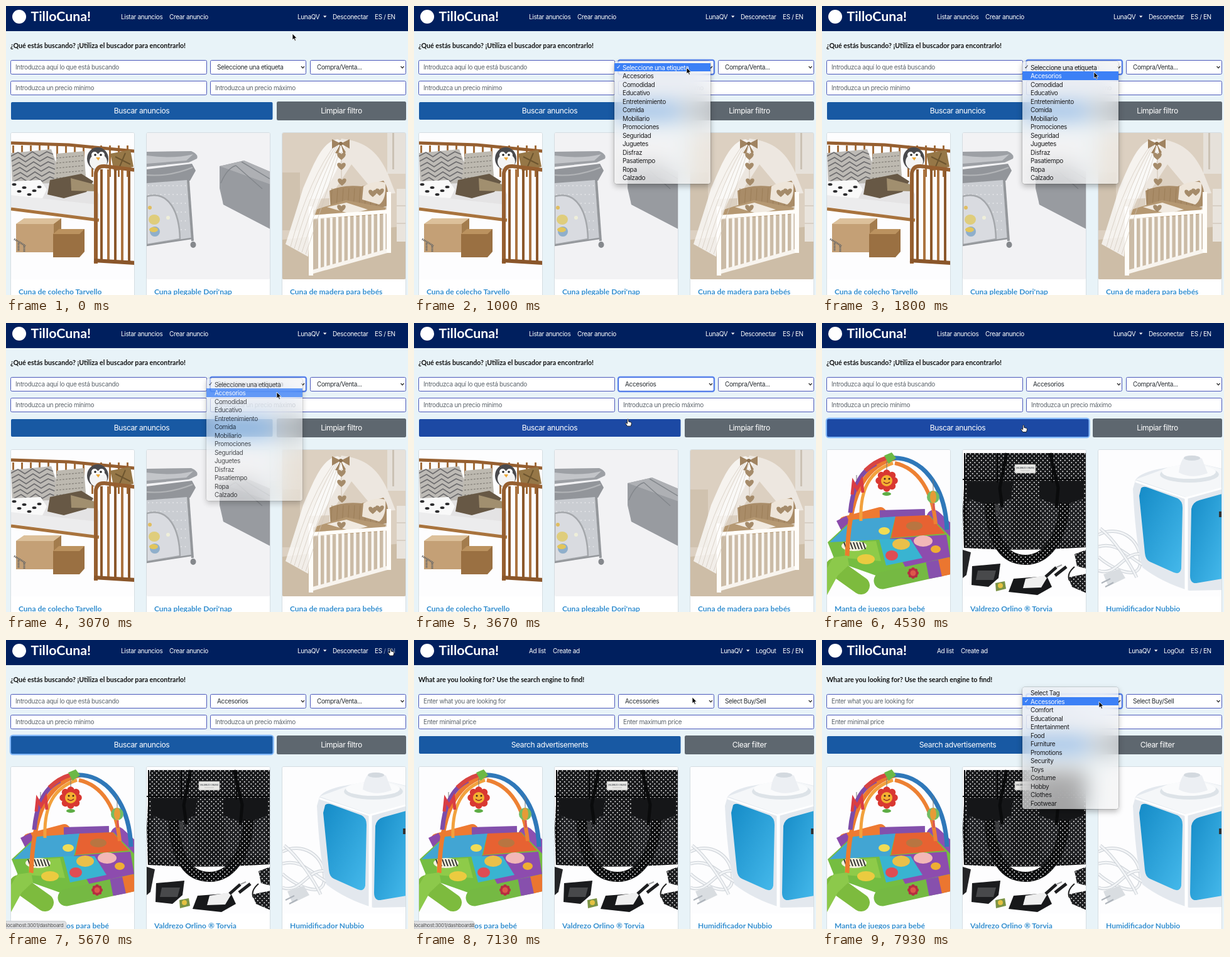
An HTML page for the animation above (8 s loop, 640 px wide and 460 px high).

```html
<!DOCTYPE html>
<html lang="es">
<head>
<meta charset="utf-8">
<title>Buscador de anuncios</title>
<style>
  html, body { margin: 0; width: 100%; height: 100%; overflow: hidden; background: #e8f3f8; }
  svg { position: absolute; left: 0; top: 0; }
  text, #menu { font: 10px Inter, sans-serif; letter-spacing: -.035em; }
  text { fill: #262b31; white-space: pre; }
  .nav { fill: #fff; }
  .hint { fill: #5d656d; }
  .button { font-size: 12.1px; fill: #fff; text-anchor: middle; }
  .brand, .question, .title { font-family: Lato, sans-serif; font-weight: 700; letter-spacing: 0; }
  .brand { font-size: 21.3px; fill: #fff; }
  .question { font-size: 10.6px; fill: #111; }
  .title { font-size: 12px; fill: #348fcf; }
  .status { font-size: 8px; fill: #555; }
  #menu { position: absolute; left: 319px; width: 153px; padding: 2.5px 0 3.25px; border-radius: 4px;
    background: rgba(242, 242, 243, .64); backdrop-filter: blur(16px) saturate(1.5); color: #1c1c1e;
    box-shadow: 0 0 0 .5px rgba(0, 0, 0, .25), 0 4px 10px rgba(0, 0, 0, .28); }
  #menu div { position: relative; height: 13.5px; line-height: 14px; padding-left: 13px; }
  #menu .hover { background: #3c80f6; color: #fff; }
  #menu .checked::before { content: "✓"; position: absolute; left: 3px; font: 9px "DejaVu Sans", sans-serif; line-height: 13.5px; }
</style>
</head>
<body>
<svg id="page" width="640" height="460"></svg>
<div id="menu"></div>
<svg width="640" height="460">
  <g id="cursor">
    <path id="arrow" d="M0 0V10L2.3 7.9 3.8 11.4 5.5 10.7 4 7.2H7Z" fill="#000" stroke="#fff" stroke-width=".8"/>
    <path id="hand" d="M-1 .6Q0-.7 1 .6V3.8L4.8 4.8Q6 5.3 5.6 7.8L4.6 11H-1L-4 6.6Q-3.4 5-1 7Z" fill="#fff" stroke="#111" stroke-width=".9"/>
  </g>
</svg>
<script>
const $ = id => document.getElementById(id);
const range = (n, make) => Array.from({ length: n }, (_, i) => make(i)).join('');
const text = (x, y, s, cls = '', id = '') => `<text x="${x}" y="${y}" class="${cls}" id="${id}">${s}</text>`;
const rect = (x, y, w, h, fill, extra = '') => `<rect x="${x}" y="${y}" width="${w}" height="${h}" fill="${fill}" ${extra}/>`;
const shape = (d, fill, extra = '') => `<path d="${d}" fill="${fill}" ${extra}/>`;
const line = (d, color, width = 1, extra = '') => shape(d, 'none', `stroke="${color}" stroke-width="${width}" ${extra}`);
const oval = (x, y, rx, ry, fill, extra = '') => `<ellipse cx="${x}" cy="${y}" rx="${rx}" ry="${ry}" fill="${fill}" ${extra}/>`;
const dot = (x, y, r, fill) => oval(x, y, r, r, fill);
const group = (id, body, extra = '') => `<g id="${id}" ${extra}>${body}</g>`;

const languages = {
  es: {
    nav: [[183, 'Listar anuncios'], [260, 'Crear anuncio'], [464, 'LunaQV'], [520, 'Desconectar']], caret: 505,
    question: '¿Qué estás buscando? ¡Utiliza el buscador para encontrarlo!',
    hints: ['Introduzca aquí lo que está buscando', 'Introduzca un precio mínimo', 'Introduzca un precio máximo'],
    deal: 'Compra/Venta...', search: 'Buscar anuncios', clear: 'Limpiar filtro',
    tags: ['Seleccione una etiqueta', 'Accesorios', 'Comodidad', 'Educativo', 'Entretenimiento', 'Comida', 'Mobiliario',
      'Promociones', 'Seguridad', 'Juguetes', 'Disfraz', 'Pasatiempo', 'Ropa', 'Calzado']
  },
  en: {
    nav: [[183, 'Ad list'], [221, 'Create ad'], [488, 'LunaQV'], [544, 'LogOut']], caret: 529,
    question: 'What are you looking for? Use the search engine to find!',
    hints: ['Enter what you are looking for', 'Enter minimal price', 'Enter maximum price'],
    deal: 'Select Buy/Sell', search: 'Search advertisements', clear: 'Clear filter',
    tags: ['Select Tag', 'Accessories', 'Comfort', 'Educational', 'Entertainment', 'Food', 'Furniture',
      'Promotions', 'Security', 'Toys', 'Costume', 'Hobby', 'Clothes', 'Footwear']
  }
};

const labels = L =>
  L.nav.map(([x, s]) => text(x, 21, s, 'nav')).join('') + shape(`M${L.caret} 15.5h5.4l-2.7 3z`, '#fff') +
  text(7, 67, L.question, 'question') +
  text(15, 101.2, L.hints[0], 'hint') + text(15, 134.2, L.hints[1], 'hint') + text(333, 134.2, L.hints[2], 'hint') +
  text(495, 101.2, L.deal) + text(216, 171.3, L.search, 'button') + text(534, 171.3, L.clear, 'button');

const field = (x, y, w) => rect(x, y, w, 22, '#fff', 'rx="2" stroke="#4a57ba"');
const chevron = x => line(`M${x - 2.5} 96l2.5 2.8 2.5-2.8`, '#333', 1.3);
const cardX = [7.5, 223.5, 439.5];
const card = x => rect(x, 201.5, 197, 270, '#fff', 'rx="2.5" stroke="#d5dde2"');
const titles = names => names.map((s, i) => text(cardX[i] + 12.5, 458.5, s, 'title')).join('');
const photos = list => list.map((body, i) => group('', body, `clip-path="url(#clip${i})"`)).join('');

const coSleeper = () => {
  const wood = '#965f30';
  return rect(8, 202, 198, 234, '#fdfdfe') +
    range(14, i => rect(10 + i * 14, 222, 3, 50, '#a26c3a')) +
    line('M8 218L100 221 205 231', wood, 5) +
    shape('M8 280L62 268 140 280 148 300V340L8 318Z', '#e4e3e4') +
    shape('M8 234L72 228 80 250 76 282 10 284Z', '#bdbab5') +
    range(6, i => line(`M${8 + i} ${239 + i * 8}l11-6 11 7 12-8 11 7 12-7 10 4`, '#6d6c6e', 1.6)) +
    shape('M81 235L124 231 127 270 120 283 76 279Z', '#bdb9b0') +
    range(5, i => line(`M80 ${242 + i * 8}L125 ${238 + i * 8}`, '#86827b', 1.3, 'stroke-dasharray="3 2"')) +
    shape('M166 235L198 229 203 256 172 263Z', '#967747') + line('M174 240L198 252M190 234L180 258', '#6d552f', 2) +
    oval(146, 243, 17, 18, '#4a4a4d') + oval(147, 248, 14, 13, '#f4f4f4') + dot(141, 237, 5, '#fff') + dot(152, 237, 5, '#fff') +
    dot(142, 237, 1.8, '#222') + dot(151, 237, 1.8, '#222') + shape('M143 241h7l-3 5z', '#eda735') +
    shape('M8 279L55 277 65 292 58 306 8 303Z', '#f9f9f9') +
    range(6, i => oval(13 + i * 8, 284 + i * 11 % 17, 3.5, 2, '#2c2c2e')) +
    shape('M70 277L120 267 139 279 128 296 92 306 66 300Z', '#675845') + shape('M103 274L141 284 146 295 104 294Z', '#a18f6f') +
    shape('M8 301L145 316V338L8 320Z', '#ececed') +
    line('M8 323L148 341', '#a8733d', 5) +
    range(6, i => rect(150 + i * 11, 260, 4, 146, i % 2 ? '#ab7340' : '#8c582b')) +
    line('M143 410V266Q145 254 157 255L206 261', wood, 6) + line('M140 405L206 409', '#8a562a', 6) +
    shape('M16 347L29 338H88V379L76 392H16Z', '#c4a076') + shape('M16 347L29 338H88L76 347Z', '#dcc09a') + shape('M76 347L88 338V379L76 392Z', '#a37c4d') +
    shape('M75 363L84 355H125V391L117 400H75Z', '#9a7042') + shape('M75 363L84 355H125L117 363Z', '#bb925f') +
    line('M13 371L20 375 31 382M20 377V390M29 382V391', '#666', 3, 'stroke-dasharray="1.5 1"');
};

const travelCot = () =>
  rect(224, 202, 197, 234, '#f2f2f4') +
  shape('M224 232L295 231Q307 236 304 243L291 249 224 256Z', '#9da0a5') + shape('M224 238Q265 244 298 236L287 246 224 251Z', '#c3c5c9') +
  shape('M224 260L296 251 302 262 293 278 224 283Z', '#92959a') + line('M224 269Q260 272 297 257', '#b3b5b8', 2) +
  shape('M224 282L288 277 295 369 224 381Z', '#cacdd2') +
  range(60, i => dot(227 + i % 10 * 6.5, 286 + Math.floor(i / 10) * 14, .8, '#f4f4f6')) +
  shape('M224 303C260 293 276 329 277 371L224 380Z', '#d9dbe0', 'stroke="#a4a7ab" stroke-width="2.5"') +
  oval(236, 340, 9, 8, '#dfcd7c') + dot(237, 359, 8, '#8fafcb') + oval(235, 356, 7, 4, '#e2c55b') + dot(229, 321, 3, '#e0bd60') + dot(258, 337, 3, '#eeeed9') +
  line('M224 381L295 370', '#94979b', 2.5) + line('M290 278L297 374', '#94979b', 4) + oval(298, 380, 4.5, 5, '#85888c') +
  shape('M340 255L379 246 421 264V355L346 316 340 290Z', '#9a9da2') + shape('M340 255L379 246 421 264V284Z', '#aeb0b4') +
  shape('M340 255L421 284V355L346 316Z', '#989ba0') + line('M342 282Q352 258 366 254L408 291M375 248L420 275', '#83878c', 1.5);

const heart = (x, y) => shape(`M${x} ${y + 6}C${x - 13} ${y - 3} ${x - 4} ${y - 9} ${x} ${y - 3}C${x + 4} ${y - 9} ${x + 13} ${y - 3} ${x} ${y + 6}Z`, '#a58b6a');
const canopyCrib = () =>
  rect(440, 202, 197, 234, '#dcd0c1') + shape('M440 372L637 350V436H440Z', '#cdbda7') +
  rect(607, 202, 30, 65, '#e6e1da') + rect(615, 202, 3, 58, '#cbc1b4') + rect(622, 291, 15, 84, '#e9e4dd') + line('M622 318h15M622 346h15', '#c7bbac') +
  rect(440, 265, 28, 92, '#d0c2af') +
  shape('M534 211C572 216 593 231 609 270L620 298 590 300 550 252 515 306 482 307Z', '#fff', 'opacity=".5"') +
  range(10, i => rect(515 + i * 9, 292, 3, 45, '#f1ece4')) +
  shape('M515 294Q535 284 566 287L601 278Q612 293 607 318L567 330 517 325Z', '#a98c68') +
  range(9, i => line(`M${519 + i * 9} 290l-2 33`, '#967751', .7)) +
  shape('M569 287Q588 276 604 281 606 308 594 316L567 308Z', '#eee5d9') + heart(584, 298) + heart(595, 296) +
  shape('M487 326L541 309 605 321 600 334 490 338Z', '#b59872') + shape('M511 320L542 313 576 324 549 331Z', '#f1eae0') + heart(534, 322) +
  shape('M489 340L609 331V388L489 422Z', '#cbbba6') +
  range(12, i => rect(497 + i * 9.4, 338 - i * .7, 4, 82 - i * 2.1, '#faf8f4')) +
  line('M485 336L610 327', '#fffdf9', 6) + line('M485 424L610 389', '#f8f4ee', 6) +
  rect(482, 319, 7, 110, '#fffdf9') + rect(606, 296, 7, 97, '#fffdf9') +
  shape('M528 212C504 216 492 246 473 290Q460 333 445 379L481 399Q484 338 506 299C526 264 539 237 540 218Z', '#fff', 'opacity=".75"') +
  range(5, i => line(`M${527 + i * 2} 217Q${484 + i * 9} 270 ${453 + i * 6} ${383 + i * 3}`, '#d0c6b9', 1, 'opacity=".7"')) +
  shape('M533 219L519 212V227Z M533 219L547 212V227Z M533 219L524 234 529 235Z M533 219L541 233 537 235Z', '#a08360') + dot(533, 219, 3, '#8c704e') +
  line('M534 232V282', '#c7b8a5', .8) + heart(534, 239) + heart(534, 255) + heart(535, 280);

const flower = (x, y, r, color, core) => range(8, i => dot(x + r * Math.cos(i * Math.PI / 4), y + r * Math.sin(i * Math.PI / 4), r * .48, color)) + dot(x, y, r * .75, core);
const playMat = () =>
  rect(8, 202, 198, 234, '#fdfdfe') +
  line('M36 317L93 302', '#ee7a32', 18, 'stroke-linecap="round"') + line('M27 323L43 315', '#8a4aab', 18) + line('M92 304L164 302', '#8350ac', 12) +
  line('M178 309L204 333', '#8d50b1', 23, 'stroke-linecap="round"') +
  shape('M48 313L171 306 205 341V385L103 408 21 379 9 349Z', '#75bd41') +
  shape('M50 313L117 308 108 344 12 349Z', '#42a5d3') + shape('M117 308L170 306 196 335 110 342Z', '#e76232') +
  shape('M108 343L198 337 205 378 135 393Z', '#8d4cae') + shape('M91 344L141 344 160 374 102 386Z', '#39b4d1') + shape('M34 350L86 347 94 379 37 374Z', '#8ecb49') +
  oval(51, 355, 20, 8, '#f3f1dd') + range(7, i => line(`M${35 + i * 5} 349l4 11`, '#333', 2)) +
  oval(126, 352, 14, 9, '#e9c04a') + oval(161, 347, 15, 9, '#f2b7b8') + oval(147, 323, 13, 7, '#b87541') + oval(99, 331, 9, 6, '#f1dc55') + oval(70, 376, 14, 8, '#ebcb40') + oval(111, 370, 10, 8, '#df4d54') + oval(181, 360, 8, 6, '#efae33') +
  line('M40 371C43 279 64 227 118 215', '#ec7b2f', 7) + line('M62 315C60 265 76 235 113 223', '#f2a13d', 5) +
  line('M45 302C49 257 64 234 86 224', '#7d4ca8', 7) + line('M69 235Q84 220 102 215', '#d84542', 7) +
  line('M110 215C157 212 196 256 199 329', '#2f78b9', 7) + line('M116 223C153 231 176 267 181 320', '#ed8133', 6) + shape('M99 211l12-5 7 9-12 9z', '#6cb846') +
  line('M103 220V239M55 242V250M177 248V267', '#777') + flower(103, 251, 12, '#d93831', '#f4b132') +
  dot(100, 248, 1.5, '#3a221a') + dot(107, 248, 1.5, '#3a221a') + line('M98 253q5 5 10 0', '#8c2620', 1.3) + oval(103, 272, 7, 3, '#5dad45') +
  line('M48 273L50 254 56 264 63 251 65 270', '#d93d43', 5) + dot(177, 277, 10, '#72bc63') + oval(177, 277, 5, 10, '#e69b37') + line('M178 287v12', '#d95555', 3) +
  line('M20 388L62 418', '#7dbb3e', 28, 'stroke-linecap="round"') + shape('M8 390L18 373 40 370 43 385 25 402 8 433Z', '#8cc94b') +
  line('M96 410L205 386', '#75b943', 27, 'stroke-linecap="round"') + line('M168 394L189 390', '#8750ad', 27) + line('M188 390L206 386', '#eb7630', 27) + flower(145, 398, 6, '#b62e40', '#dd574b');

const dotted = (d, fill) => shape(d, fill) + shape(d, 'url(#dots)');
const polkaBag = () => {
  const handle = 'M267 286C270 352 292 377 324 377S383 346 386 286';
  return rect(224, 202, 197, 234, '#fdfdfe') +
    dotted('M229 207H421V357Q321 364 226 358L224 300Z', '#18191b') +
    shape('M232 253H304L301 284Q265 299 232 283Z M346 252H416V284Q382 298 347 284Z', '#151618') +
    dotted('M234 279Q269 297 301 279V346H238Z M347 279Q380 297 415 279V344H350Z', '#202124') +
    line('M227 207V357M224 249H421M279 207V254M367 207V254', '#08090a', 2) +
    line(handle, '#0b0c0d', 16) + line(handle, 'url(#dots)', 14) +
    line('M294 207L283 263 287 293M363 207L376 262 373 295', '#0a0b0c', 5) + rect(276, 289, 6, 17, '#3d3e40') +
    rect(307, 225, 33, 14, '#e9e9e7', 'stroke="#888" stroke-width=".6"') +
    `<text x="323.5" y="232" style="font-size:3.4px;text-anchor:middle">VALDREZO ORLINO</text>` + line('M316 235h15', '#aaa', .6) +
    shape('M224 361L237 365 230 401 224 406Z', '#242527') + shape('M239 387L284 383 281 406 265 420 238 417Z', '#1b1c1e') + shape('M248 394h29l-4 15h-28z', '#48494b') + shape('M276 414l15-3 2 12-16 4z', '#7b9345') + dot(284, 418, 4, '#e5c141') +
    shape('M305 407L358 403 366 420 343 433 297 428Z', '#17181a') + shape('M324 407l37-6-12 20-29 1z', '#efefef') +
    line('M356 404L373 389M371 402L389 388', '#1d1e20', 5) + line('M373 389l9-4', '#a3a4a6', 2) +
    dotted('M402 368L421 361V391L406 387Z M392 405L421 399V430L398 420Z', '#1c1d1f') + line('M402 388Q389 399 394 410', '#222', 2);
};

const humidifier = () =>
  rect(440, 202, 197, 234, '#fdfdfe') +
  ['M440 337C470 321 507 341 507 379S454 386 440 372', 'M440 356C476 345 494 385 528 391', 'M440 394C472 405 480 359 513 369', 'M443 327C466 345 491 384 501 405']
    .map(d => line(d, '#cbd0d6', 5) + line(d, '#f2f4f6', 3)).join('') +
  shape('M448 400l26-9 9 15-27 13z', '#d9dde1') + line('M445 414l14-7M451 420l13-7', '#aeb4bb', 2) +
  shape('M499 250Q504 240 533 233L595 222 637 232V425L585 426Q541 413 510 389 499 347 495 264Z', '#e3e8ee') +
  shape('M499 249L551 230 604 224 637 233V264L582 278Z', '#f5f7f9') + oval(585, 241, 47, 13, '#dde3e8') + oval(584, 237, 43, 11, '#fafbfc') +
  shape('M568 238Q570 220 578 212 593 208 605 216L614 239Q589 249 568 238Z', '#eceff3') + oval(589, 215, 13, 4, '#d3d9df') +
  shape('M508 263Q511 259 519 262L566 279Q574 283 574 294L572 391Q570 401 560 397L522 380Q515 377 514 366L505 275Z', 'url(#blue)') +
  shape('M588 296Q590 285 601 282L637 272V407L596 414Q586 415 586 402Z', 'url(#blue)') +
  line('M580 279V425', '#fff', 5) + line('M499 252L579 279 637 263', '#fff', 3) + shape('M632 300h5v9h-5z', '#333');

$('page').innerHTML = `<defs>
    <pattern id="dots" width="7" height="7" patternUnits="userSpaceOnUse">${dot(1.8, 1.8, .95, '#f4f4f4')}${dot(5.3, 5.3, .95, '#f4f4f4')}</pattern>
    <linearGradient id="blue" x2="1" y2="1"><stop stop-color="#158bc7"/><stop offset="1" stop-color="#45b9eb"/></linearGradient>
    ${cardX.map((x, i) => `<clipPath id="clip${i}">${rect(x + .5, 202, 196, 233, '#000', 'rx="2"')}</clipPath>`).join('')}
  </defs>` +
  rect(0, 0, 640, 460, '#e8f3f8') + rect(0, 0, 640, 40, '#001f5e') +
  dot(21, 17, 11, '#fff') + text(39.5, 24, 'TilloCuna!', 'brand') +
  text(587, 21, 'ES <tspan id="english">/ EN</tspan>', 'nav') +
  field(7.5, 86.5, 312) + field(325.5, 86.5, 152) + field(484.5, 86.5, 152) + field(7.5, 119.5, 312) + field(325.5, 119.5, 311) +
  chevron(472.5) + chevron(631) + text(336, 101.2, '', '', 'tag') +
  rect(325, 86, 153, 23, 'none', 'id="selectRing" rx="3" stroke="#3f72ee" stroke-opacity=".75" stroke-width="2.4"') +
  rect(7, 152, 418.5, 30, 'none', 'id="searchRing" rx="4" stroke="#83b9fa" stroke-width="2.4"') +
  rect(8, 153, 416.5, 28, '#1859a3', 'id="search" rx="2"') + rect(431, 152, 206, 30, '#5e676f', 'rx="2.5"') +
  cardX.map(card).join('') +
  group('cribs', photos([coSleeper(), travelCot(), canopyCrib()]) + titles(['Cuna de colecho Tarvello', "Cuna plegable Dori'nap", 'Cuna de madera para bebés'])) +
  group('accessories', group('accessoryPhotos', photos([playMat(), polkaBag(), humidifier()])) + titles(['Manta de juegos para bebé', 'Valdrezo Orlino ® Torvia', 'Humidificador Nubbio'])) +
  Object.entries(languages).map(([id, L]) => group(id, labels(L))).join('') +
  group('statusBar', shape('M0 447.5H92Q96 447.5 96 452V460H0Z', '#dedfe1', 'stroke="#b9bcc0" stroke-width=".7"') + text(0, 457, '', 'status', 'link'));

const DURATION = 8000, ROW = 13.5;
const at = { open: 1000, pick: 3000, closed: 3300, search: 4000, loaded: 4270, hoverEnglish: 5450, translate: 6150, statusOff: 7350, reopen: 7560 };
// Time and tip position; the pointer eases between neighbouring stops.
const stops = [[0, 456, 44], [250, 456, 44], [850, 434, 98], [1150, 434, 98], [1600, 433, 105], [2000, 433, 105], [2700, 431, 110],
  [3200, 431, 110], [3850, 320, 163], [4500, 320, 163], [5550, 612, 14], [6250, 612, 14], [7050, 443, 91], [7250, 443, 91], [7750, 441, 98], [8000, 441, 98]];

function pointer(t) {
  const i = stops.findIndex(s => s[0] > t);
  const [t0, x0, y0] = stops[i - 1], [t1, x1, y1] = stops[i];
  const p = (t - t0) / (t1 - t0), k = p * p * (3 - 2 * p);
  return [x0 + (x1 - x0) * k, y0 + (y1 - y0) * k];
}

const show = (id, visible) => $(id).style.display = visible ? '' : 'none';
let menuState = '';

function drawMenu(t, y, lang) {
  const opacity = t >= at.reopen ? 1 : t < at.open ? 0 : Math.min(1, Math.max(0, (at.closed - t) / (at.closed - at.pick)));
  const checked = lang === 'en' ? 1 : 0;
  const firstRow = 90.5 - checked * ROW;
  const hover = t > at.pick && t < at.closed ? 1 : Math.floor((y - firstRow) / ROW);
  const menu = $('menu');
  show('menu', opacity > 0);
  menu.style.opacity = opacity;
  menu.style.top = firstRow - 2.5 + 'px';
  if (menuState === lang + hover) return;
  menuState = lang + hover;
  menu.innerHTML = languages[lang].tags.map((tag, i) =>
    `<div class="${i === hover ? 'hover ' : ''}${i === checked ? 'checked' : ''}">${tag}</div>`).join('');
}

function frame(now) {
  const t = now % DURATION;
  const [x, y] = pointer(t);
  const lang = t < at.translate ? 'es' : 'en';
  const overSearch = x < 425 && y > 152 && y < 182;
  const overEnglish = x > 594 && y < 25;

  show('es', lang === 'es');
  show('en', lang === 'en');
  $('tag').textContent = languages[lang].tags[t < at.closed - 50 ? 0 : 1];
  $('english').style.opacity = overEnglish ? .55 : 1;
  show('selectRing', t >= at.open && t < at.search || t >= at.reopen);
  show('searchRing', t >= at.search && t < at.translate);
  $('search').setAttribute('fill', overSearch ? '#1c49a4' : '#1859a3');
  show('cribs', t < at.search);
  show('accessories', t >= at.search);
  show('accessoryPhotos', t >= at.loaded);
  show('statusBar', t >= at.hoverEnglish && t < at.statusOff);
  $('link').textContent = 'localhost:3001/dashboard' + (lang === 'en' ? '#' : '');
  drawMenu(t, y, lang);

  $('cursor').setAttribute('transform', `translate(${x} ${y})`);
  show('hand', overSearch || overEnglish);
  show('arrow', !overSearch && !overEnglish);
  requestAnimationFrame(frame);
}
requestAnimationFrame(frame);
</script>
</body>
</html>
```
